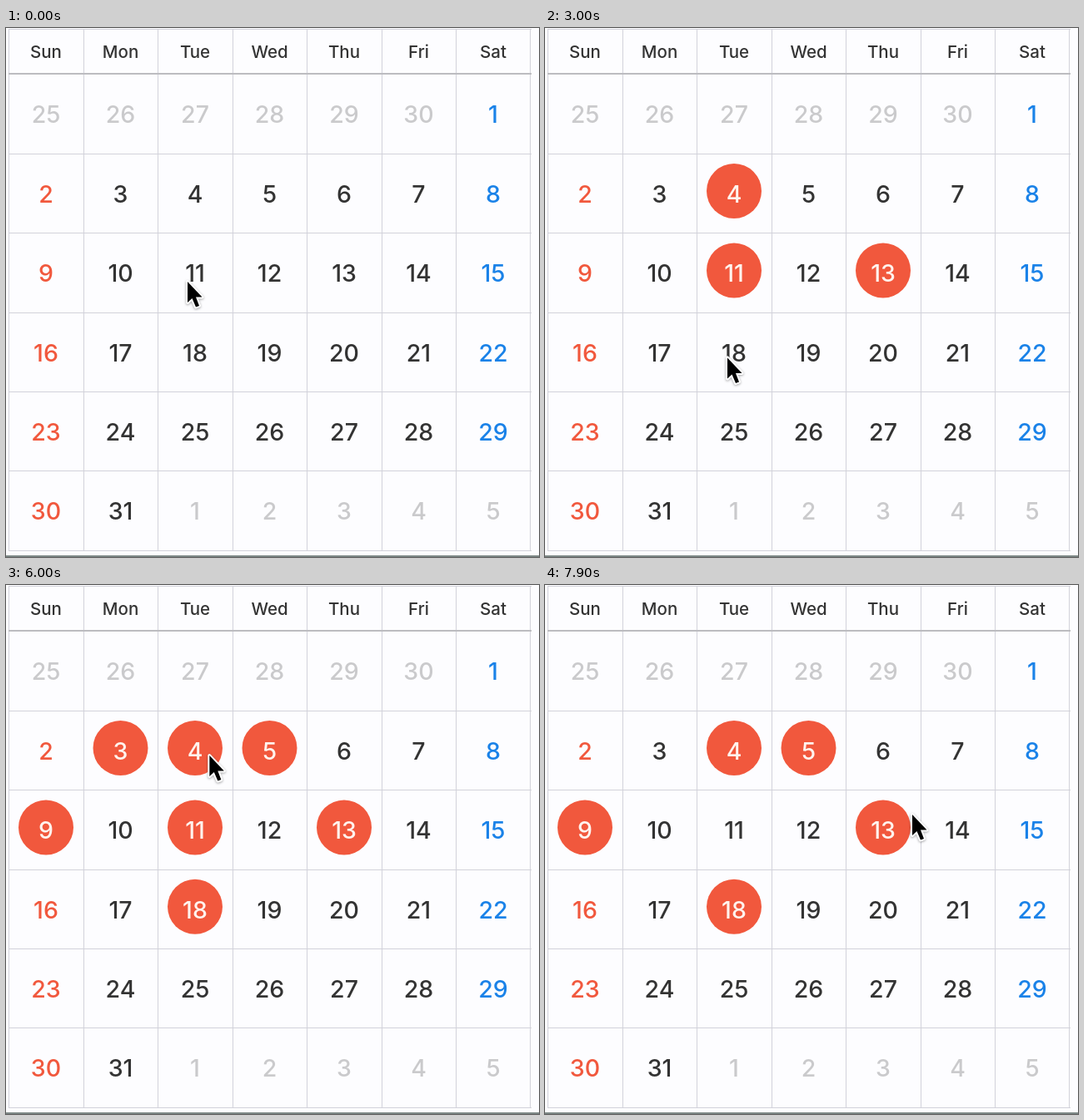
These frames come from a looping animation (640x636 px, 8000 ms). An HTML page with a canvas:

```html
<!DOCTYPE html>
<html lang="en">
<head>
<meta charset="utf-8">
<title>Calendar</title>
<style>
html, body { margin: 0; width: 100%; height: 100%; overflow: hidden; background: #fdfdff; }
canvas { display: block; width: 640px; height: 636px; }
</style>
</head>
<body>
<canvas id="stage" width="640" height="636"></canvas>
<script>
const ctx = document.getElementById('stage').getContext('2d');
const LOOP = 8000, STEP = 100;
const SETTLE = 200, HOLD = 100; // pointer rest before and after a click
const DAYS = ['Sun', 'Mon', 'Tue', 'Wed', 'Thu', 'Fri', 'Sat'];
const FONT = 'Inter, Roboto, sans-serif';
const INK = '#333333', MUTED = '#cacacc', RED = '#f1583d', BLUE = '#1a82e8', LINE = '#d2d2da';
const colX = c => 48 + 89.5 * c;
const rowY = r => 104.2 + 95.4 * r;

// Each click toggles a day: day, time, pointer offset from the cell centre
const clicks = [
  [11, 300, -10, 7], [13, 1100, -4, 2], [4, 2200, -5, 5], [18, 3200, -9, 3],
  [9, 3800, 5, -28], [3, 4500, 1, -2], [5, 5300, 10, 6], [3, 6900, 1, -2],
  [11, 7400, -7, 3], [13, LOOP + 100, 34, -22]
];

const isOn = (n, t) => clicks.filter(c => c[0] === n && c[1] <= t).length % 2 === 1;

function spot([day, , dx, dy]) {
  const i = day + 5;
  return [colX(i % 7) + dx, rowY(Math.floor(i / 7)) + dy];
}

function pointerAt(t) {
  const i = clicks.findIndex(c => c[1] + HOLD > t);
  const to = clicks[i], from = clicks[Math.max(0, i - 1)];
  const t0 = from[1] + HOLD, t1 = to[1] - SETTLE;
  const u = i ? Math.min(1, (t - t0) / (t1 - t0)) : 1;
  const e = u * u * (3 - 2 * u);
  const a = spot(from), b = spot(to);
  return a.map((v, k) => v + (b[k] - v) * e);
}

function rect(color, x, y, w, h) {
  ctx.fillStyle = color;
  ctx.fillRect(x, y, w, h);
}

function label(text, x, y, size, color) {
  ctx.font = `500 ${size}px ${FONT}`;
  ctx.fillStyle = color;
  ctx.fillText(text, x, y);
}

function drawGrid() {
  rect('#fdfdff', 0, 0, 640, 636);
  for (let c = 0; c <= 7; c++) rect(LINE, Math.round(3.3 + 89.45 * c), 1, 1, 628);
  rect(LINE, 3, 1, 628, 1);
  for (let r = 1; r <= 6; r++) rect(LINE, 3, Math.floor(55.9 + 95.4 * r), 628, 1);
  rect('#bcbcc0', 3, 54, 628, 2);
  rect('#7d8886', 0, 634, 640, 2);
}

function drawDay(i, t) {
  const c = i % 7, n = i - 5;
  const x = colX(c), y = rowY(Math.floor(i / 7));
  const inside = n >= 1 && n <= 31;
  const day = n < 1 ? n + 30 : n > 31 ? n - 31 : n;
  let color = !inside ? MUTED : c === 0 ? RED : c === 6 ? BLUE : INK;
  if (inside && isOn(n, t)) {
    ctx.fillStyle = RED;
    ctx.beginPath();
    ctx.arc(x, y - 3.6, 33, 0, Math.PI * 2);
    ctx.fill();
    color = '#fff3ee';
  }
  label(day, x, y + 10.1, 28.5, color);
}

function drawPointer(x, y) {
  ctx.save();
  ctx.translate(x, y);
  ctx.beginPath();
  [[1, 3], [1, 28], [6.5, 23], [11, 33.5], [15, 32], [11, 21.5], [18.5, 21.5]]
    .forEach(p => ctx.lineTo(...p));
  ctx.closePath();
  ctx.lineJoin = 'round';
  ctx.shadowColor = 'rgba(0, 0, 0, .35)';
  ctx.shadowBlur = 3;
  ctx.shadowOffsetY = 1;
  ctx.strokeStyle = '#fff';
  ctx.lineWidth = 4;
  ctx.stroke();
  ctx.shadowColor = 'transparent';
  ctx.fillStyle = '#000';
  ctx.fill();
  ctx.restore();
}

function draw(now) {
  const t = Math.floor((now % LOOP) / STEP) * STEP;
  ctx.textAlign = 'center';
  drawGrid();
  DAYS.forEach((d, c) => label(d, colX(c), 35.8, 20.5, INK));
  for (let i = 0; i < 42; i++) drawDay(i, t);
  drawPointer(...pointerAt(t));
}

const start = performance.now();
function tick() {
  draw(performance.now() - start);
  requestAnimationFrame(tick);
}
tick();
</script>
</body>
</html>
```
